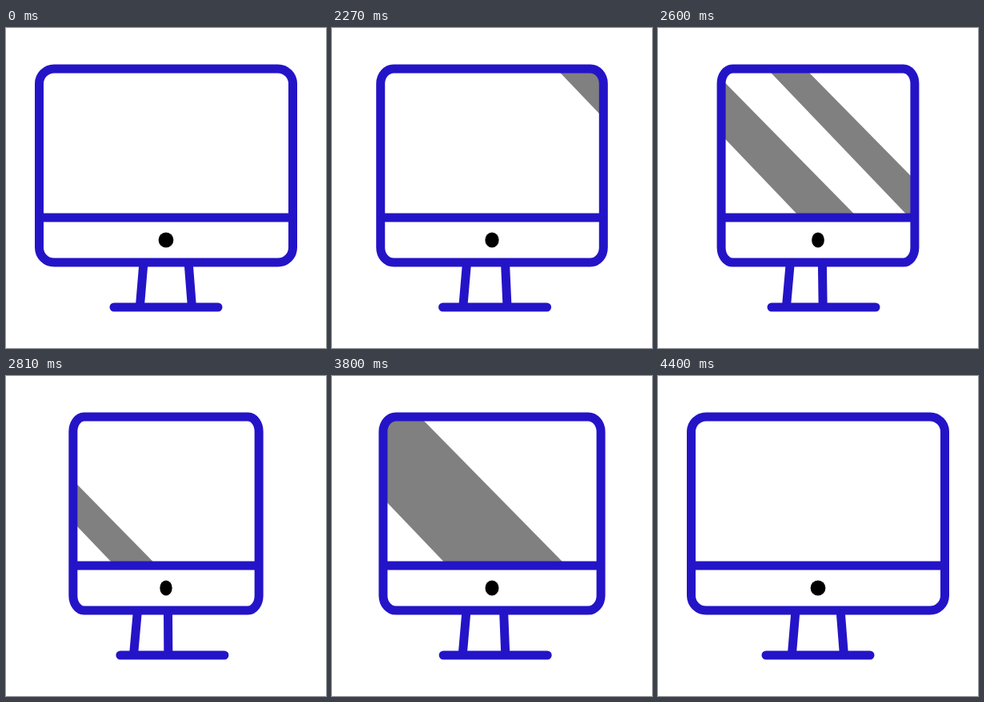
An HTML page that plays this animation: 400 by 400 pixels, repeating every 4.43 s.

```html
<!DOCTYPE html>
<html lang="en">
<head>
<meta charset="utf-8">
<title>Turning monitor</title>
<style>
html, body { margin: 0; width: 100%; height: 100%; overflow: hidden; background: #fff; }
svg { display: block; width: 100vw; height: 100vh; }
</style>
</head>
<body>
<svg viewBox="0 0 400 400">
  <defs>
    <clipPath id="glass"><rect id="pane" y="51" height="242" ry="18.6"/></clipPath>
  </defs>
  <g clip-path="url(#glass)" fill="#808080">
    <path id="broad"/>
    <path id="narrow"/>
    <path id="flash"/>
  </g>
  <g fill="none" stroke="#2414c7" stroke-width="11">
    <path id="legs"/>
    <path id="foot" stroke-linecap="round"/>
    <path id="chin"/>
    <rect id="frame" y="51" height="242" ry="18.6"/>
  </g>
  <ellipse id="dot" cx="200" cy="265" ry="9.4"/>
</svg>
<script>
const LOOP = 4430;
const el = id => document.getElementById(id);
const set = (id, attrs) => {
  for (const k in attrs) el(id).setAttribute(k, attrs[k]);
};

// Cubic bezier easing with y handles at 0 and 1
function ease(x, x1, x2) {
  if (x <= 0) return 0;
  if (x >= 1) return 1;
  let lo = 0, hi = 1, s = 0.5;
  for (let i = 0; i < 24; i++) {
    s = (lo + hi) / 2;
    const v = 3 * x1 * s * (1 - s) ** 2 + 3 * x2 * s * s * (1 - s) + s ** 3;
    if (v < x) lo = s; else hi = s;
  }
  return s * s * (3 - 2 * s);
}

// 0 = facing front, 1 = fully turned
function turn(t) {
  return t < 3195
    ? ease((t - 2010) / 1185, 0.2, 0.14)
    : 1 - ease((t - 3195) / 1210, 0.6, 0.4);
}

// Diagonal band; a and b are its edges along the top of the glass
function band(id, a, b) {
  const at = (x, y, slope) => `${x + (y - 57) / slope} ${y}`;
  set(id, { d: `M${at(a, 45, 1.045)}L${at(b, 45, 1.017)}L${at(b, 237, 1.017)}L${at(a, 237, 1.045)}Z` });
}

function draw(t) {
  const p = turn(t);
  const half = 158.5 - 45 * p;
  const box = { x: 200 - half, width: 2 * half, rx: 18.6 * half / 158.5 };
  set('frame', box);
  set('pane', box);
  set('chin', { d: `M${200 - half} 237H${200 + half}` });
  set('dot', { rx: 9.4 - 1.8 * p });
  set('legs', {
    d: `M${172 - 8 * p} 293L${167.4 - 8.3 * p} 348` +
       `M${228.1 - 27.2 * p} 293L${232.4 - 31.4 * p} 348`
  });
  set('foot', { d: `M${135 + 8.4 * p} 349H${265 + 8.4 * p}` });

  const down = -0.85 * (t - 2600);
  const up = 0.85 * (t - 3800);
  band('broad', 6.6 + down, 73.5 + down);
  band('narrow', 143 + down, 191 + down);
  band('flash', -28.8 + up, 115 + up);
}

const start = performance.now();
function tick() {
  draw((performance.now() - start) % LOOP);
  requestAnimationFrame(tick);
}
tick();
</script>
</body>
</html>
```
